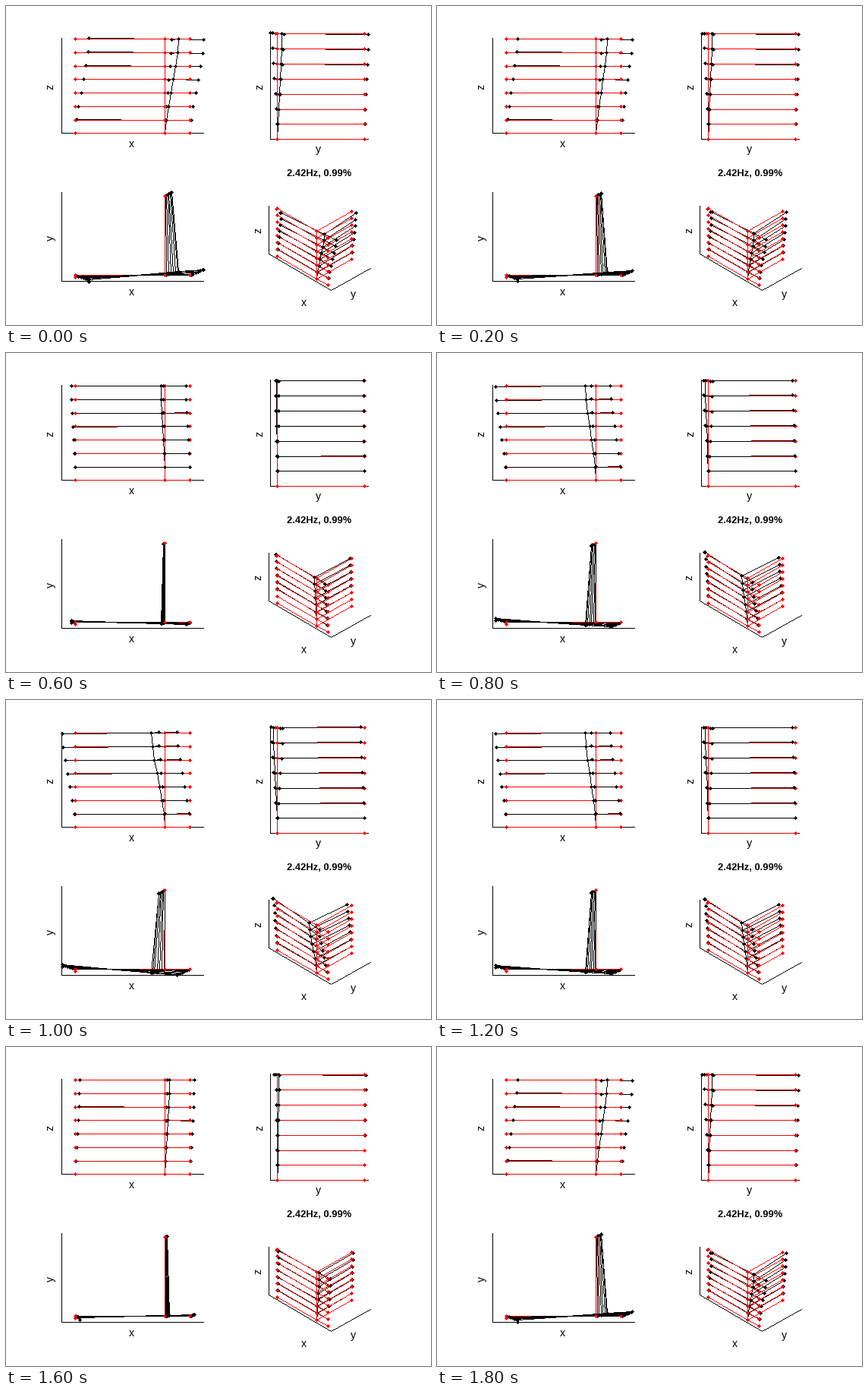
These frames come from a looping animation (560x420 px, 2 s). A matplotlib script:

```python
import numpy as np
import matplotlib.pyplot as plt
from matplotlib.animation import ArtistAnimation
from matplotlib.collections import PolyCollection

RED, BLACK = "#ff0000", "#000000"
FRAMES, INTERVAL = 10, 200

# Plan layout of the storey nodes and their top-storey modal displacement
REST = {"A": (91.4, 0), "B": (209.4, 0), "C": (242.4, 0), "D": (209.4, 104.3)}
MODE = {"A": (17.5, -6, 0.8), "B": (18, 5, 0), "C": (17.5, 7.6, -0.8),
        "D": (8.5, 4.6, -0.8)}
SHAPE = [0, 0.1, 0.23, 0.42, 0.6, 0.78, 0.93, 1]
STOREYS = len(SHAPE)
STOREY_HEIGHT = 17.73
BEAMS = ["AB", "BC", "BD"]


def front(x, y, z):
    return x, 167.28 - z


def side(x, y, z):
    return 357.4 + 1.1 * y, 175.25 - 1.1196 * z


def plan(x, y, z):
    return x, 354.3 - y


def iso(x, y, z):
    u, v = x - 73, y + 7.7
    return 346 + 0.4385 * u + 0.44 * v, 326 + 0.254 * u - 0.248 * v - 0.504 * z


def node(name, storey, amp, y_shift=0):
    x, y = REST[name]
    dx, dy, dz = MODE[name]
    a = amp * SHAPE[storey]
    return x + a * dx, y + y_shift + a * dy, storey * STOREY_HEIGHT + a * dz


def pixel(view, point):
    return np.round(view(*point))


def box(lo, hi):
    """Rectangle that fills the pixels from lo to hi."""
    (x0, y0), (x1, y1) = np.subtract(lo, 0.5), np.add(hi, 0.5)
    return [(x0, y0), (x1, y0), (x1, y1), (x0, y1)]


def stairs(p, q):
    """One-pixel line without smoothing, as a list of straight runs."""
    p, q = np.array(p), np.array(q)
    reach = np.abs(q - p)
    points = np.round(np.linspace(p, q, int(reach.max()) + 1))
    minor = points[:, np.argmin(reach)]
    cuts = np.flatnonzero(np.diff(minor)) + 1
    return [box(run.min(axis=0), run.max(axis=0)) for run in np.split(points, cuts)]


def fill(boxes, color, z):
    return ax.add_collection(PolyCollection(
        boxes, facecolors=color, edgecolors="none", linewidths=0,
        snap=False, zorder=z), autolim=False)


def lines(segments, color, z):
    return fill([b for p, q in segments for b in stairs(p, q)], color, z)


def dots(centers, color, z):
    sizes = [(2, 0), (1, 1), (0, 2)]
    return fill([box(c - s, c + s) for c in centers for s in np.array(sizes)],
                color, z)


def red_on_top(view, beam, storey, amp):
    if view is plan:
        return False
    low_bay = view is front and beam == "AB" and storey in (2, 3)
    return view is iso or amp > 0 or low_bay


def draw_view(view, amp):
    under, black, over = [], [], []
    for s in range(STOREYS):
        for beam in BEAMS:
            rest = [pixel(view, node(n, s, 0)) for n in beam]
            (over if red_on_top(view, beam, s, amp) else under).append(rest)
            if s:
                black.append([pixel(view, node(n, s, amp)) for n in beam])
    column = [pixel(view, node("B", s, amp)) for s in range(STOREYS)]
    black += zip(column, column[1:])
    over.append([pixel(view, node("B", s, 0)) for s in (0, STOREYS - 1)])

    spots = [(n, s, 0) for s in range(STOREYS) for n in REST]
    spots.append(("A", STOREYS - 1, -2.5))
    rest = [pixel(view, node(n, s, 0, dy)) for n, s, dy in spots]
    moved = [(n, pixel(view, node(n, s, amp, dy))) for n, s, dy in spots if s]
    # Moved nodes hide the resting ones where they are nearer to the viewer
    near = [c for n, c in moved if view is side and n != "D"
            or view in (side, front) and amp < 0]

    return [lines(under, RED, 2), lines(black, BLACK, 3), lines(over, RED, 4),
            dots([c for _, c in moved], BLACK, 5), dots(rest, RED, 6),
            dots(near, BLACK, 7)]


def label(x, y, text, rotation=0, size=10.2, weight="normal"):
    ax.text(x, y, text, rotation=rotation, size=size, weight=weight,
            family="Liberation Sans", ha="center", va="center")


fig = plt.figure(figsize=(5.6, 4.2), dpi=100, facecolor="white")
ax = fig.add_axes([0, 0, 1, 1])
ax.set(xlim=(-0.5, 559.5), ylim=(419.5, -0.5))
ax.axis("off")

for path in [[(73, 42), (73, 167), (260, 167)],
             [(348, 35), (348, 175), (477, 175)],
             [(73, 245), (73, 362), (260, 362)],
             [(346, 263), (346, 326), (428, 374), (480, 345)]]:
    lines(zip(path, path[1:]), BLACK, 1)

for x, y, text in [(164.5, 181.5, "x"), (411, 189, "y"), (164.5, 376.5, "x"),
                   (392, 390.5, "x"), (457, 380, "y")]:
    label(x, y, text)
for x, y, text in [(58, 106, "z"), (333.5, 106, "z"), (58.5, 304.5, "y"),
                   (331.5, 295, "z")]:
    label(x, y, text, rotation=90)
label(412, 220.5, "2.42Hz, 0.99%", size=9.3, weight="bold")

scenes = []
for i in range(FRAMES):
    amp = np.cos(2 * np.pi * i / FRAMES)
    scenes.append([artist for view in (front, side, plan, iso)
                   for artist in draw_view(view, amp)])

anim = ArtistAnimation(fig, scenes, interval=INTERVAL, repeat=True, repeat_delay=0)
plt.show()
```
